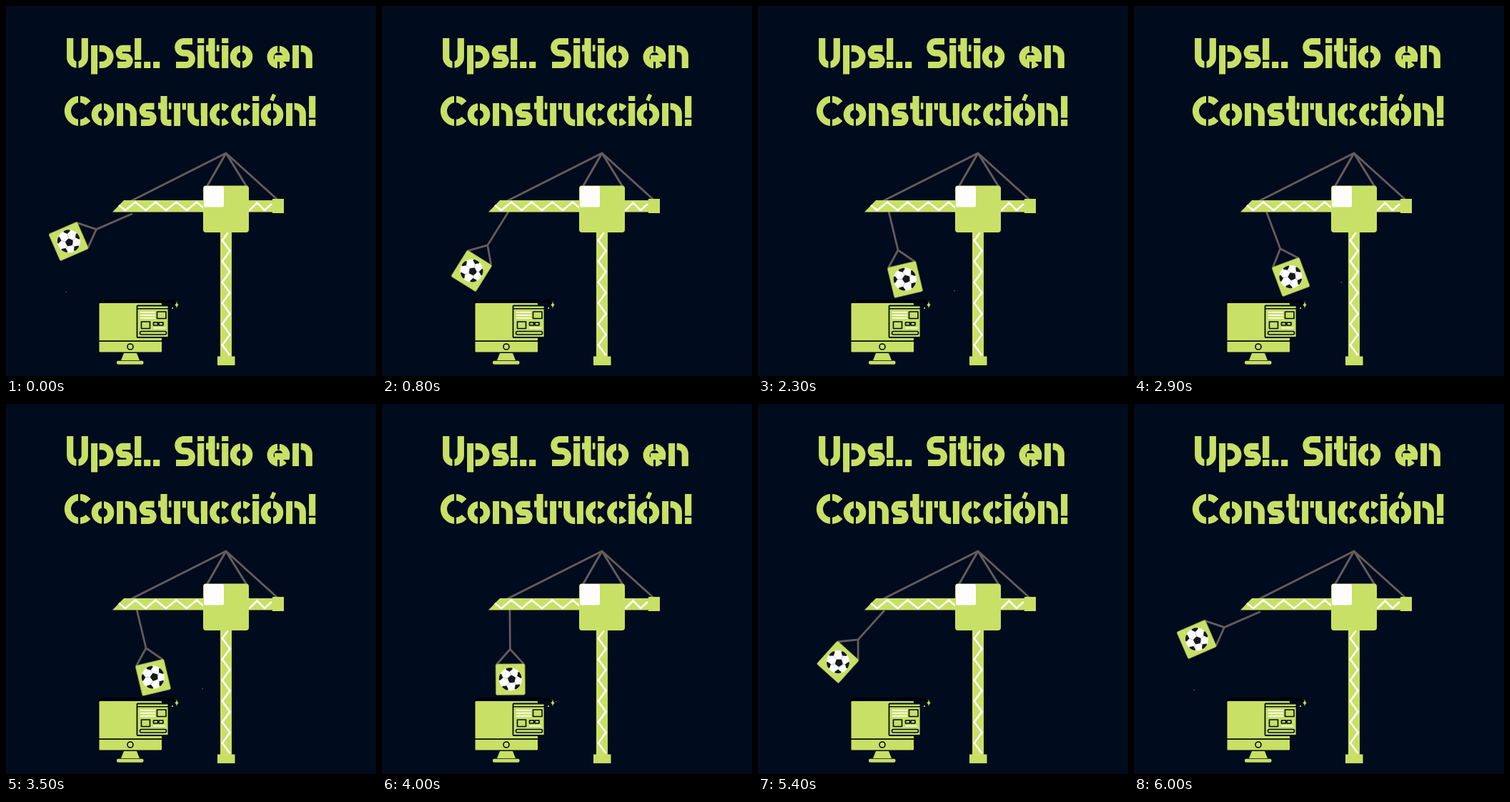
These frames come from a looping animation (518 px wide and 518 px high, 6.3 s). An HTML page with a canvas:

```html
<!DOCTYPE html>
<html lang="es">
<head>
<meta charset="utf-8">
<title>Sitio en construcción</title>
<style>
  html, body { margin: 0; width: 100%; height: 100%; overflow: hidden; background: #000b1d; }
  canvas { display: block; width: 518px; height: 518px; }
</style>
</head>
<body>
<canvas id="stage" width="518" height="518" role="img" aria-label="Ups!.. Sitio en Construcción!"></canvas>
<script>
const ctx = document.getElementById('stage').getContext('2d');
const BG = '#000b1d', LIME = '#c8e065', ROPE = '#665b5c', WHITE = '#fdfdfd';
const LOOP = 6300;

// Stencil face: advance, centre-line path from the baseline, slits [x, y, w, h]
const BOWL = 'M4.3-16a11.2 11.2 0 1 1 22.4 0a11.2 11.2 0 1 1-22.4 0';
const RING_SLIT = [[14, -33, 3, 34]];
const STEM_SLIT = [[9.3, -33, 2.4, 42]];
const FACE = {
  U: [34, 'M4.7-42V-15a10.3 10.3 0 0 0 20.6 0V-42', [[13.5, -14, 3, 15]]],
  p: [35, 'M4.7-32V8.5M11-27.4H15.5a11.3 11.3 0 0 1 0 22.8H11', STEM_SLIT],
  s: [26, 'M20.5-27.6H9.5a5.4 5.7 0 0 0 0 11.4H13.5a5.6 5.8 0 0 1 0 11.6H2', []],
  '!': [13, 'M4.7-42V-11.5M4.7-9V0', []],
  '.': [13, 'M4.7-9V0', []],
  ' ': [17, '', []],
  S: [32, 'M25-37.5H13a8.2 8.2 0 0 0 0 16.4h3a8.2 8.2 0 0 1 0 16.6H2', []],
  i: [12, 'M4.7-32V0M4.7-42v7', []],
  t: [22, 'M8-42V-10a5.5 5.5 0 0 0 5.5 5.5H18.5M0-28H18.5', [[12.6, -33, 2.2, 10]]],
  o: [35, BOWL, RING_SLIT],
  'ó': [35, BOWL + 'M14.2-41L19.2-38.7', RING_SLIT],
  e: [35, 'M10-13.6H26.6A11.3 11.3 0 1 0 23.5-7.5', [[14, -33, 3, 10], [14, -9, 3, 10]]],
  n: [32, 'M4.7-32V0M11-27.4H13a10.3 10.3 0 0 1 10.3 10.3V0', STEM_SLIT],
  C: [38, 'M33-32A16.4 16.4 0 1 0 33-10', [[19, -43, 3, 44]]],
  c: [30, 'M24-24A11.3 11.3 0 1 0 24-8', RING_SLIT],
  r: [19, 'M4.7-32V0M11-27.4H17', STEM_SLIT],
  u: [31, 'M4.7-32V-15a9.5 10.3 0 0 0 9.3 10.3H18M23.3-32V0', [[16.3, -15, 2.4, 16]]]
};

function write(text, x, y) {
  for (const ch of text) {
    const [advance, path, slits] = FACE[ch];
    ctx.save();
    ctx.translate(x, y);
    ctx.strokeStyle = LIME;
    ctx.lineWidth = 9.2;
    ctx.stroke(new Path2D(path));
    ctx.fillStyle = BG;
    for (const s of slits) ctx.fillRect(...s);
    ctx.restore();
    x += advance;
  }
}

function rect(color, x, y, w, h, r = 0) {
  ctx.fillStyle = color;
  ctx.beginPath();
  ctx.roundRect(x, y, w, h, r);
  ctx.fill();
}

function frame(x, y, w, h, r = 0, width = 1.6) {
  ctx.strokeStyle = BG;
  ctx.lineWidth = width;
  ctx.beginPath();
  ctx.roundRect(x, y, w, h, r);
  ctx.stroke();
}

function draw(path, color, width) {
  const p = new Path2D(path);
  if (width) {
    ctx.strokeStyle = color;
    ctx.lineWidth = width;
    ctx.stroke(p);
  } else {
    ctx.fillStyle = color;
    ctx.fill(p);
  }
}

function disc(color, x, y, r) {
  ctx.fillStyle = color;
  ctx.beginPath();
  ctx.arc(x, y, r, 0, 2 * Math.PI);
  ctx.fill();
}

function pentagon(x, y, r, turn) {
  ctx.fillStyle = '#16181b';
  ctx.beginPath();
  for (let i = 0; i < 5; i++) {
    const a = turn + i * 0.4 * Math.PI;
    ctx.lineTo(x + r * Math.cos(a), y + r * Math.sin(a));
  }
  ctx.fill();
}

function ball(y) {
  ctx.save();
  ctx.translate(0, y);
  disc(WHITE, 0, 0, 16);
  ctx.beginPath();
  ctx.arc(0, 0, 16, 0, 2 * Math.PI);
  ctx.clip();
  const turn = -Math.PI / 2 - 0.1;
  pentagon(1.8, 0, 6, turn);
  for (let i = 0; i < 5; i++) {
    const a = turn + i * 0.4 * Math.PI, c = Math.cos(a), s = Math.sin(a);
    draw(`M${1.8 + 5 * c} ${5 * s}L${12 * c} ${12 * s}`, '#b9bcc0', 0.8);
    pentagon(15.5 * c, 15.5 * s, 5, a + Math.PI);
  }
  ctx.restore();
}

function load(deg) {
  const drift = Math.max(0, (5.5 - deg) / 19);
  ctx.save();
  ctx.translate(176.9 + 6.3 * drift, 288.3 + Math.max(0, deg - 32) * 0.07);
  ctx.rotate(deg * Math.PI / 180);
  draw('M0 0V55M-19 76L0 55L19 76', ROPE, 2.8);
  rect(LIME, -20.5, 75.5, 41, 43.5, 2);
  ctx.strokeStyle = '#7f8c50';
  ctx.lineWidth = 0.7;
  ctx.stroke();
  ball(97);
  rect('rgba(200,224,101,.6)', 63, 128.3, 1.3, 1.3);
  ctx.restore();
}

function crane() {
  draw('M149 288.5L165 272H277V288.5Z', LIME);
  draw('M158 279L167 286L181 274.5L195.5 286L209.5 274.5L224 286L238.5 274.5L253 286L267 274.5L278 284', WHITE, 2.7);
  rect(LIME, 339, 272, 36, 16.5);
  draw('M340 285L341 286L351.5 275.5L362 286L372 277', WHITE, 2.7);
  rect(LIME, 373, 270, 16, 20);
  rect(LIME, 300, 316, 16, 176);
  let zig = 'M311 317';
  for (let k = 1; k <= 12; k++) zig += `L${k % 2 ? 302.8 : 313.5} ${313.5 + 14.65 * k}`;
  draw(zig, WHITE, 2.7);
  rect(LIME, 296, 490.5, 24.5, 12.5);
  rect(LIME, 276, 251.5, 64, 65.5, 4);
  rect(WHITE, 277, 252, 28, 29.5, 2);
}

function monitor() {
  rect('#00030a', 130, 411, 104, 5);
  rect(LIME, 130.5, 416, 87.5, 68.5, 1);
  rect(BG, 130, 468.3, 88, 1.7);
  ctx.strokeStyle = BG;
  ctx.lineWidth = 1.6;
  ctx.beginPath();
  ctx.arc(174, 477, 4, 0, 2 * Math.PI);
  ctx.stroke();
  draw('M165 486H183L187 496H161Z', LIME);
  rect(LIME, 155, 496.7, 37.5, 5, 2);

  rect(LIME, 183.5, 419.5, 44, 44.5, 1);
  frame(183.5, 419.5, 44, 44.5, 1, 1.8);
  rect(BG, 184, 423, 43, 1.5);
  for (let y = 428; y <= 436; y += 4) rect(WHITE, 188, y, 21, 1.7);
  frame(211.5, 428, 12.5, 9.5);
  frame(189.5, 442, 12, 9.5);
  frame(206.5, 443, 6, 4);
  frame(214, 443, 6, 4);
  rect(WHITE, 206, 450, 17, 1.4);
  frame(187.5, 455.5, 37, 4.5, 2);

  draw('M239 412.5Q239.3 418 242 418.5Q239.3 419 239 424Q238.7 419 236 418.5Q238.7 418 239 412.5', LIME);
  draw('M234 408Q234.5 413 238 413.5Q234.5 414 234 419Q233.5 414 230 413.5Q233.5 413 234 408', '#000');
  disc(LIME, 233, 423, 1.1);
}

// The load swings in held steps, out and back
const SWING = [66.5, 56, 42, 32, 25, 15.5, 5.5, -0.5, -7, -13.5, -18, -20.5];
function angleAt(t) {
  const step = t < 3000 ? Math.min(11, Math.floor(t / 250)) : 20 - Math.floor(t / 300);
  return SWING[Math.max(0, step)];
}

function render(t) {
  rect(BG, 0, 0, 518, 518);
  ctx.lineJoin = 'miter';
  write('Ups!.. Sitio en', 85, 87);
  write('Construcción!', 82, 168);
  ctx.lineJoin = 'round';
  draw('M173 274L308 206L281 253M337 253L308 206L381 272', ROPE, 3);
  monitor();
  load(angleAt(t));
  ctx.lineJoin = 'miter';
  crane();
}

const start = performance.now();
function tick() {
  render((performance.now() - start) % LOOP);
  requestAnimationFrame(tick);
}
tick();
</script>
</body>
</html>
```
